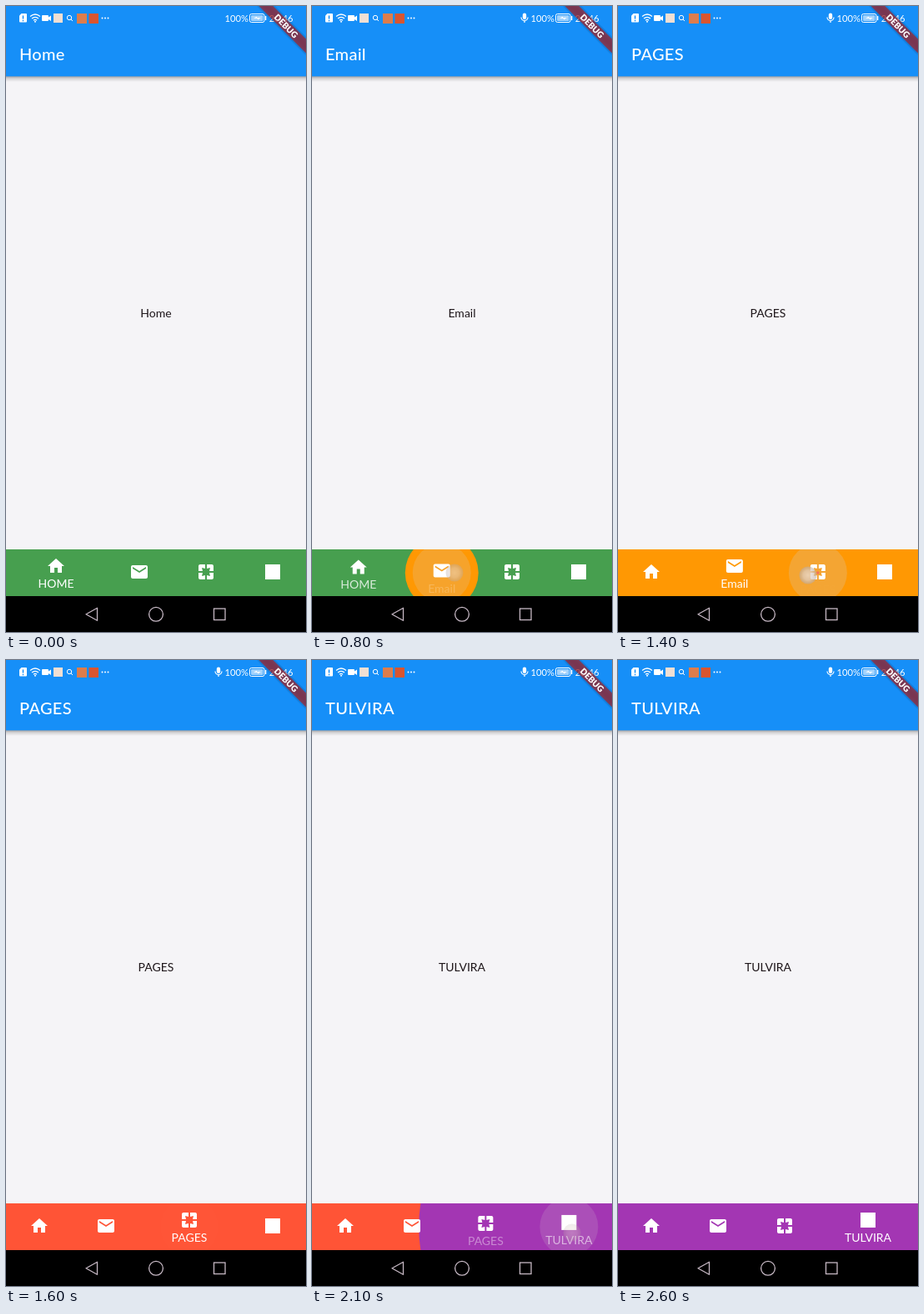
Animation, 360 px wide and 750 px high, one loop 2700 ms. Source, as an HTML page:

```html
<!DOCTYPE html>
<html lang="en">
<head>
<meta charset="utf-8">
<title>Shifting navigation bar</title>
<style>
  html, body { margin: 0; width: 100%; height: 100%; overflow: hidden; background: #000; }
  svg { display: block; width: 360px; height: 750px; font-family: Lato, "Open Sans", sans-serif; }
  .mid { text-anchor: middle; font-size: 14px; }
  #title { font-size: 20px; font-weight: 500; letter-spacing: .3px; }
</style>
</head>
<body>
<svg viewBox="0 0 360 750">
  <defs>
    <linearGradient id="shade" x2="0" y2="1">
      <stop stop-color="#000" stop-opacity=".36"/>
      <stop offset=".4" stop-color="#000" stop-opacity=".14"/>
      <stop offset="1" stop-color="#000" stop-opacity="0"/>
    </linearGradient>
    <radialGradient id="finger">
      <stop stop-color="#eaddd4" stop-opacity=".85"/>
      <stop offset=".55" stop-color="#dccdc4" stop-opacity=".8"/>
      <stop offset="1" stop-color="#b9aaa2" stop-opacity=".6"/>
    </radialGradient>
    <filter id="blur"><feGaussianBlur stdDeviation="2.5"/></filter>
    <clipPath id="barClip"><rect y="651" width="360" height="56"/></clipPath>
  </defs>

  <rect width="360" height="651" fill="#f5f4f7"/>
  <rect y="84" width="360" height="7" fill="url(#shade)"/>
  <rect width="360" height="84.300" fill="#168ff8"/>
  <text id="title" x="16" y="65" fill="#fff"></text>
  <text id="body" class="mid" x="180" y="373" fill="#1d1519"></text>

  <!-- status bar -->
  <g fill="#fff">
    <path d="M16 11.500l2.500-2.500H24q1 0 1 1v8.500q0 1-1 1h-7q-1 0-1-1z"/>
    <path d="M20.500 11.500v4M20.500 16.800v1.400" stroke="#168ff8" stroke-width="1.500"/>
    <path d="M29 12.500q6-5 12 0M31 15q4-3.400 8 0M33 17.300q2-1.700 4 0" fill="none" stroke="#fff" stroke-width="1.300"/>
    <circle cx="35" cy="18.800" r="1"/>
    <path d="M44 11h6q1 0 1 1v1.500l3-2v6.500l-3-2V17q0 1-1 1h-6q-1 0-1-1v-5q0-1 1-1z"/>
    <rect x="57" y="9" width="11" height="11" fill="#f1dfd3"/>
    <circle cx="76" cy="14" r="2.700" fill="none" stroke="#fff"/>
    <path d="M78 16l2 2" stroke="#fff"/>
    <rect x="85" y="9" width="12" height="12" fill="#dd7d4c"/>
    <rect x="99.500" y="9" width="11.500" height="12" fill="#d9552f"/>
    <circle cx="115.500" cy="14.500" r="1"/><circle cx="119" cy="14.500" r="1"/><circle cx="122.500" cy="14.500" r="1"/>
    <g id="mic">
      <rect x="252.800" y="8.500" width="4.400" height="7.500" rx="2.200"/>
      <path d="M251 13.500a4 4 0 0 0 8 0M255 17.500v2.500" fill="none" stroke="#fff" stroke-width="1.200"/>
    </g>
    <g font-size="11.200">
      <text x="262.500" y="19">100%</text>
      <text x="344.500" y="19" text-anchor="end">20:46</text>
    </g>
    <rect x="292.500" y="9.500" width="17.500" height="10" rx="2" fill="none" stroke="#fff"/>
    <rect x="294" y="11" width="14.500" height="7" rx="1" fill-opacity=".6"/>
    <path d="M297 14.700l4-2v1.200h5l-4 2.600v-1.400z"/>
    <rect x="311" y="12" width="1.300" height="5"/>
  </g>

  <!-- bottom bar -->
  <g clip-path="url(#barClip)">
    <rect id="base" y="651" width="360" height="56"/>
    <circle id="wave" cy="679"/>
    <circle id="glow" cy="679" r="35" fill="#d0d0d0"/>
    <g id="items" fill="#fff"></g>
  </g>
  <rect y="707" width="360" height="43"/>
  <g fill="none" stroke="#c6b8c4" stroke-width="1.300">
    <path d="M109.500 721.300v15l-13.500-7.500z" stroke-linejoin="round"/>
    <circle cx="180" cy="728.800" r="8.400"/>
    <rect x="249.500" y="722" width="13.500" height="13.500"/>
  </g>
  <circle id="touch" r="10.500" fill="url(#finger)"/>

  <!-- corner banner -->
  <g transform="translate(360) rotate(45)">
    <rect x="-42" y="28" width="84" height="12" filter="url(#blur)" opacity=".3"/>
    <rect x="-42" y="28" width="84" height="12" fill="#b71c1c" fill-opacity=".63"/>
    <text y="37.600" text-anchor="middle" font-size="10.200" font-weight="900" fill="#fff">DEBUG</text>
  </g>
</svg>
<script>
const LOOP = 2700, SHIFT = 200, MIC_ON = 500;

const tabs = [
  { title: "Home", label: "HOME", color: "#479f4f",
    icon: "M10 20v-6h4v6h5v-8h3L12 3 2 12h3v8z" },
  { title: "Email", label: "Email", color: "#ff9803",
    icon: "M20 4H4c-1.1 0-2 .9-2 2v12c0 1.1.9 2 2 2h16c1.1 0 2-.9 2-2V6c0-1.1-.9-2-2-2zm0 4l-8 5-8-5V6l8 5 8-5z" },
  { title: "PAGES", label: "PAGES", color: "#ff5436",
    icon: "M3 5v6h5L7 7l4 1V3H5c-1.1 0-2 .9-2 2zm5 8H3v6c0 1.1.9 2 2 2h6v-5l-4 1zm9 4l-4-1v5h6c1.1 0 2-.9 2-2v-6h-5zm2-14h-6v5l4-1-1 4h5V5c0-1.1-.9-2-2-2z" },
  { title: "TULVIRA", label: "TULVIRA", color: "#a336b3",
    icon: "M3 3h18v18H3z" }
];

const taps = [
  { tab: 1, down: 600, up: 753, x: 171, y: 679 },
  { tab: 2, down: 1290, up: 1390, x: 228, y: 682 },
  { tab: 3, down: 1880, up: 2024, x: 312, y: 686 }
];

const $ = id => document.getElementById(id);
const clamp = v => Math.min(1, Math.max(0, v));

function set(el, attrs) {
  for (const key in attrs) el.setAttribute(key, attrs[key]);
}

function add(parent, name, attrs) {
  const el = document.createElementNS("http://www.w3.org/2000/svg", name);
  set(el, attrs);
  return parent.appendChild(el);
}

// cubic-bezier(.4, 0, .2, 1)
function ease(x) {
  if (x <= 0 || x >= 1) return clamp(x);
  let lo = 0, hi = 1, s;
  for (let i = 0; i < 24; i++) {
    s = (lo + hi) / 2;
    const bx = 1.2 * s * (1 - s) ** 2 + 0.6 * s * s * (1 - s) + s ** 3;
    if (bx < x) lo = s; else hi = s;
  }
  return s * s * (3 - 2 * s);
}

for (const tab of tabs) {
  tab.iconEl = add($("items"), "path", { d: tab.icon });
  tab.labelEl = add($("items"), "text", { class: "mid" });
  tab.labelEl.textContent = tab.label;
}

function layout(current, previous, p) {
  let left = 0;
  tabs.forEach((tab, i) => {
    const w = i === current ? p : i === previous ? 1 - p : 0;
    const width = 80 * (1 + w / 2);
    const drop = 7 * (1 - w);
    tab.x = left + width / 2;
    left += width;
    set(tab.iconEl, { transform: `translate(${tab.x - 12} ${659 + drop})` });
    set(tab.labelEl, { x: tab.x, y: 697 + drop, opacity: w });
  });
}

function draw(t) {
  const done = taps.filter(tap => t >= tap.up);
  const last = done[done.length - 1];
  const current = last ? last.tab : 0;
  const previous = last ? current - 1 : -1;
  const p = last ? ease((t - last.up) / SHIFT) : 1;
  const tab = tabs[current];

  layout(current, previous, p);
  $("title").textContent = $("body").textContent = tab.title;
  set($("base"), { fill: p < 1 ? tabs[previous].color : tab.color });
  set($("wave"), {
    cx: tab.x,
    r: p * Math.hypot(Math.max(tab.x, 360 - tab.x), 28),
    fill: tab.color
  });

  const tap = taps.find(k => t >= k.down && t < k.up + 230);
  let glow = 0, touch = 0;
  if (tap) {
    glow = 0.25 * clamp((t - tap.down) / 100) * clamp(1 - (t - tap.up) / 215);
    touch = clamp(1 - (t - tap.up) / 120);
    set($("glow"), { cx: tabs[tap.tab].x });
    set($("touch"), { cx: tap.x, cy: tap.y });
  }
  set($("glow"), { opacity: glow });
  set($("touch"), { opacity: touch });
  set($("mic"), { opacity: t >= MIC_ON ? 1 : 0 });
}

function tick() {
  draw(performance.now() % LOOP);
  requestAnimationFrame(tick);
}
tick();
</script>
</body>
</html>
```
